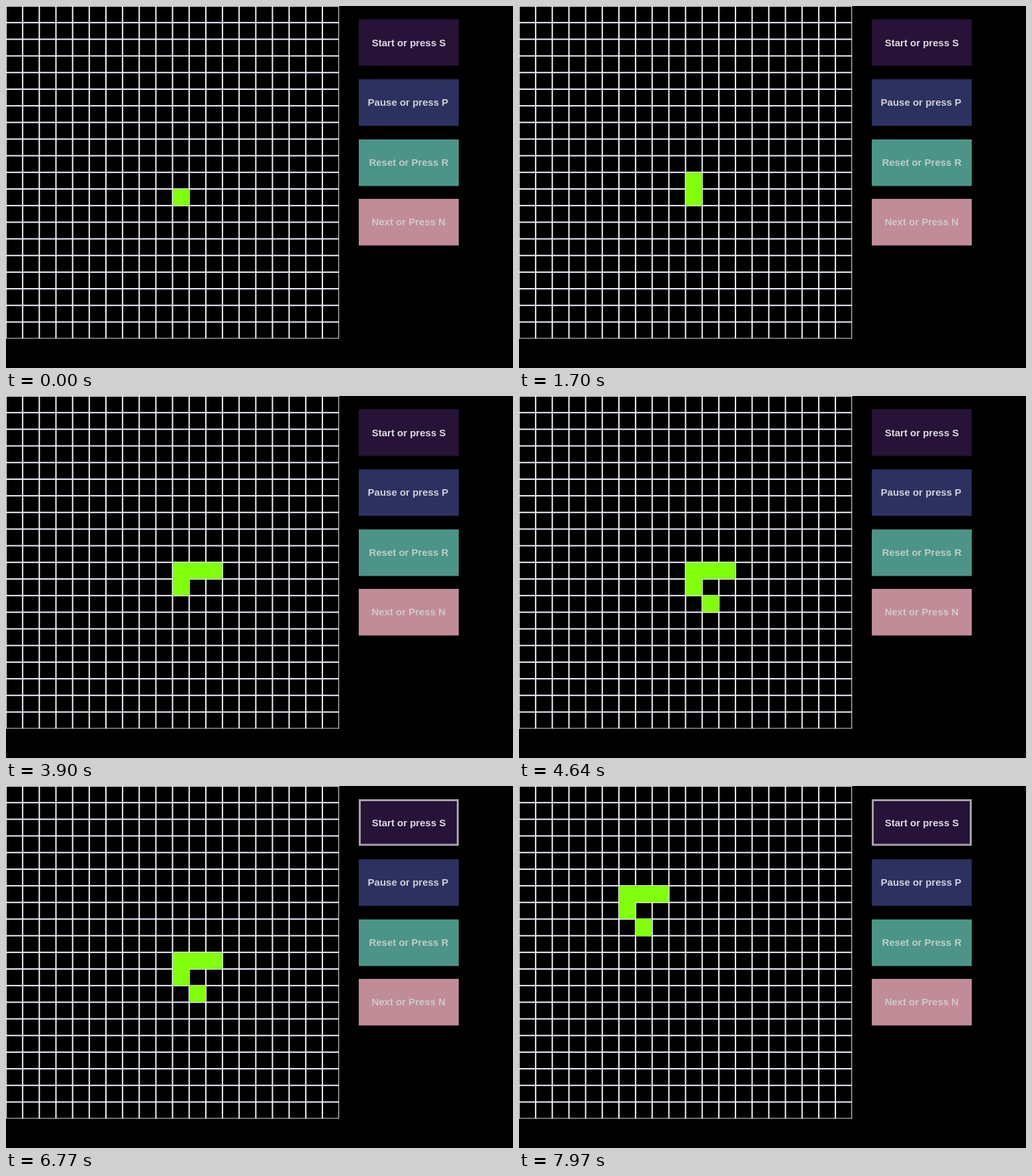
An HTML page with a canvas for the animation above (8000 ms loop, 766 px wide and 548 px high).

```html
<!DOCTYPE html>
<html lang="en">
<head>
<meta charset="utf-8">
<title>Game of Life</title>
<style>
  html, body { margin: 0; width: 100%; height: 100%; overflow: hidden; background: #000; }
  canvas { display: block; }
</style>
</head>
<body>
<canvas id="stage" width="766" height="548"></canvas>
<script>
const ctx = document.getElementById('stage').getContext('2d');
const LOOP = 8000, SIZE = 20, CELL_W = 25.16, CELL_H = 25.18;
const START_AT = 6735, FIRST_STEP = 6805, STEP = 75;

// Cells switched on by hand: time, column, row
const clicks = [
  [0, 10, 11], [850, 10, 10], [2400, 11, 10], [3150, 12, 10], [4600, 11, 12]
];

const buttons = [
  { label: 'Start or press S', x: 552.7, fill: '#271238', ink: '#e0dce2' },
  { label: 'Pause or press P', x: 546.6, fill: '#2c3160', ink: '#d2d2da' },
  { label: 'Reset or Press R', x: 548.4, fill: '#4c9487', ink: '#bccec8' },
  { label: 'Next or Press N', x: 552.4, fill: '#c08c98', ink: '#d0c8ce' }
];

function nextGeneration(cells) {
  const counts = new Map();
  for (const key of cells) {
    const [x, y] = key.split(',').map(Number);
    for (let dx = -1; dx <= 1; dx++)
      for (let dy = -1; dy <= 1; dy++) {
        if (!dx && !dy) continue;
        const near = `${x + dx},${y + dy}`;
        counts.set(near, (counts.get(near) || 0) + 1);
      }
  }
  return [...counts.keys()].filter(key =>
    counts.get(key) === 3 || (counts.get(key) === 2 && cells.includes(key)));
}

function cellsAt(t) {
  let cells = clicks.filter(([at]) => t >= at).map(([, x, y]) => `${x},${y}`);
  const steps = Math.floor((t - FIRST_STEP) / STEP) + 1;
  for (let i = 0; i < steps; i++) cells = nextGeneration(cells);
  return cells;
}

function drawGrid() {
  const width = SIZE * CELL_W, height = SIZE * CELL_H;
  ctx.save();
  ctx.beginPath();
  ctx.rect(0, 0, width, height);
  ctx.clip();
  ctx.fillStyle = '#f2f0fc';
  for (let i = 0; i <= SIZE; i++) {
    ctx.fillRect(i * CELL_W - 1, 0, 2, height);
    ctx.fillRect(0, i * CELL_H - 1, width, 2);
  }
  ctx.restore();
}

function drawCell(key) {
  const [x, y] = key.split(',').map(Number);
  const left = Math.round(x * CELL_W), top = Math.round(y * CELL_H);
  ctx.fillStyle = '#82ff0c';
  ctx.fillRect(left, top, Math.round((x + 1) * CELL_W) - left, Math.round((y + 1) * CELL_H) - top);
}

function drawButton({ label, x, fill, ink }, index, active) {
  const top = 20.2 + index * 90.66, edge = Math.round(top);
  ctx.fillStyle = fill;
  ctx.fillRect(533, edge, 151, 70.5);
  if (active) {
    ctx.strokeStyle = '#a8a0a8';
    ctx.lineWidth = 3;
    ctx.strokeRect(534.5, edge + 1.5, 148, 67.5);
  }
  ctx.fillStyle = ink;
  ctx.fillText(label, x, top + 40.3);
}

function draw(now) {
  const t = now % LOOP;
  ctx.fillStyle = '#000';
  ctx.fillRect(0, 0, 766, 548);
  drawGrid();
  cellsAt(t).forEach(drawCell);
  ctx.font = 'bold 15px "Liberation Sans", Arial, sans-serif';
  buttons.forEach((button, i) => drawButton(button, i, i === 0 && t >= START_AT));
}

const began = performance.now();
function frame() {
  draw(performance.now() - began);
  requestAnimationFrame(frame);
}
frame();
</script>
</body>
</html>
```
